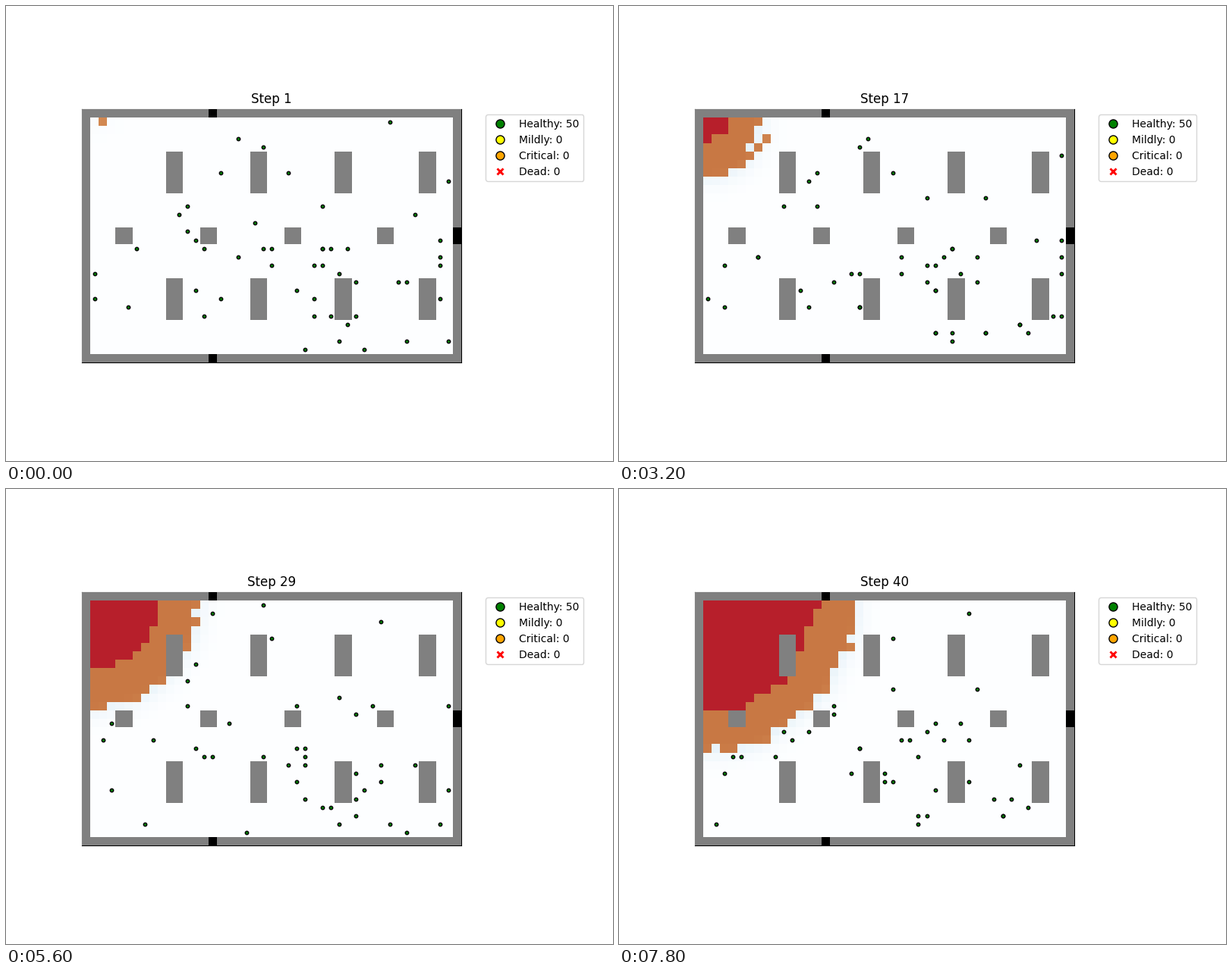
Recreate the animation shown at these times as a matplotlib script. Size 800x600 px, loop 8 s.

```python
import math
import random

import numpy as np
import matplotlib.pyplot as plt
from matplotlib.animation import FuncAnimation
from matplotlib.lines import Line2D

W, H, STEPS, CROWD, LEAVERS = 45, 30, 40, 50, 11
FIRE_SPEED = 0.46  # cells per step
BURN_TIME = 10     # steps from flame to ember
rng = random.Random(7)

FLOOR = np.array([253, 254, 255])
SMOKE = np.array([205, 228, 242])
FLAME_LIGHT = np.array([212, 140, 84])
FLAME = np.array([200, 120, 68])
EMBER = np.array([183, 31, 43])

# Room plan
free = np.zeros((H, W), bool)
free[1:-1, 1:-1] = True
for c in (10, 20, 30, 40):
    for r in (5, 20):
        free[r:r + 5, c:c + 2] = False
for c in (4, 14, 24, 35):
    free[14:16, c:c + 2] = False
EXITS = [(15, 0), (15, 29), (44, 14), (44, 15)]

# The fire spreads as a ragged circle around the corner
flame_at = np.array([[math.hypot(c, r) / FIRE_SPEED + rng.gauss(0, 0.8)
                      for c in range(W)] for r in range(H)])
flame_at[1, 2] = 1


def blur(a):
    p = np.pad(a, 1, mode="edge")
    h, w = a.shape
    return sum(p[i:i + h, j:j + w] for i in range(3) for j in range(3)) / 9


def room(step):
    burning = flame_at <= step
    smoke = burning.astype(float)
    inside = smoke[1:-1, 1:-1]
    for _ in range(4):
        inside = blur(inside)
    smoke[1:-1, 1:-1] = inside
    smoke = smoke[..., None]
    img = FLOOR + smoke ** 1.4 * (SMOKE - FLOOR)
    heat = np.clip(smoke / 0.6, 0, 1)
    img[burning] = (FLAME_LIGHT + heat * (FLAME - FLAME_LIGHT))[burning]
    img[flame_at + BURN_TIME <= step] = EMBER
    img[~free] = 128
    for c, r in EXITS:
        img[r, c] = 0
    return img.round().astype(np.uint8)


def around(p):
    return [(p[0] + dx, p[1] + dy) for dx in (-1, 0, 1) for dy in (-1, 0, 1)]


def nearest_exit(p):
    return min(EXITS, key=lambda e: math.dist(p, e))


def wander(p, step):
    """One random step that keeps clear of the fire."""
    moves = [(c, r) for c, r in around(p) if free[r, c]]
    safe = [(c, r) for c, r in moves if flame_at[r, c] > step + 2]
    return rng.choice(safe) if safe else max(moves, key=lambda q: flame_at[q[::-1]])


def head_out(p, door):
    moves = [(c, r) for c, r in around(p) if free[r, c]]
    return min(moves, key=lambda q: math.dist(q, door))


# Few people start at the top or on the left
cells = [(c, r) for r in range(H) for c in range(W)
         if free[r, c] and flame_at[r, c] > 17]
weights = [(0.35 if r < 11 else 1) * (0.25 if c < 11 else 1) for c, r in cells]
crowd = rng.choices(cells, weights, k=CROWD)
crowd.sort(key=lambda p: math.dist(p, nearest_exit(p)))

places = np.full((STEPS + 1, CROWD, 2), np.nan)
for who, p in enumerate(crowd):
    gone = 19 + 2 * who if who < LEAVERS else math.inf
    places[1, who] = p
    for step in range(2, STEPS + 1):
        if step >= gone:
            break
        door = nearest_exit(p)
        if gone - step <= math.dist(p, door) + 1:
            p = head_out(p, door)
        else:
            p = wander(p, step)
        places[step, who] = p

# Figure
fig, ax = plt.subplots(figsize=(8, 6), dpi=100)
fig.subplots_adjust(right=0.75)
picture = ax.imshow(room(1), interpolation="nearest", zorder=2.6)
people, = ax.plot([], [], "o", ms=3.2, mfc="green", mec="black", mew=1, zorder=3)
ax.set(xticks=[], yticks=[], xlim=(-0.5, W - 0.5), ylim=(H - 0.5, -0.5))
title = ax.set_title("Step 1")


def key(label, color, marker="o", edge="black"):
    return Line2D([0], [0], marker=marker, color="w", markerfacecolor=color,
                  markeredgecolor=edge, markersize=8, label=label)


ax.legend(handles=[key(f"Healthy: {CROWD}", "green"), key("Mildly: 0", "yellow"),
                   key("Critical: 0", "orange"),
                   key("Dead: 0", "red", "X", "w")],
          loc="upper left", bbox_to_anchor=(1.05, 1))


def draw(i):
    step = i + 1
    picture.set_data(room(step))
    people.set_data(places[step, :, 0], places[step, :, 1])
    title.set_text(f"Step {step}")
    return picture, people, title


anim = FuncAnimation(fig, draw, frames=STEPS, interval=200, repeat=True,
                     repeat_delay=0)
plt.show()
```
